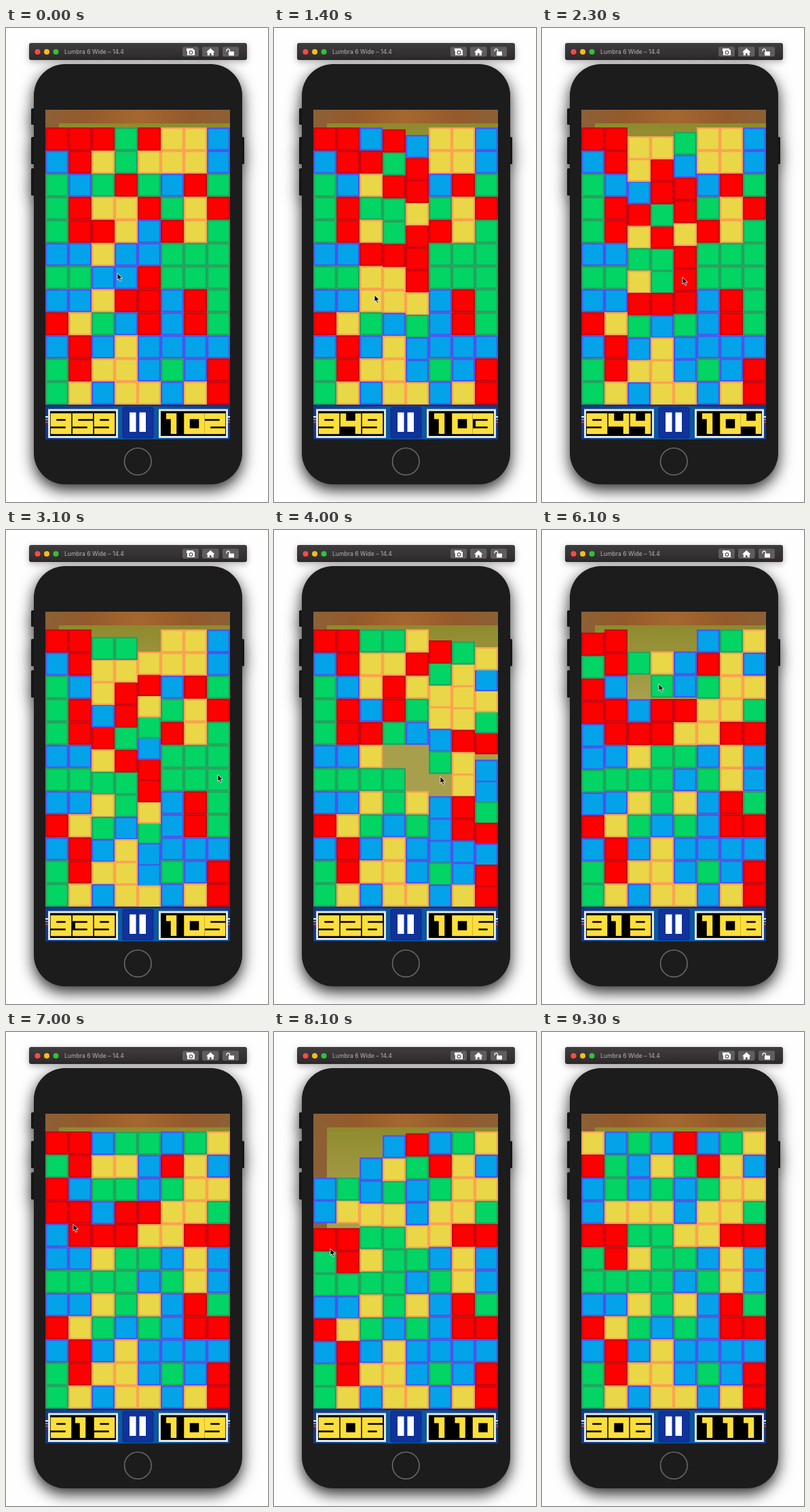
Recreate the animation shown at these times as an HTML page. Size 386 px wide and 696 px high, loop 9.4 s.

```html
<!DOCTYPE html>
<html lang="en">
<head>
<meta charset="utf-8">
<title>Block puzzle</title>
<style>
html, body { margin: 0; width: 100%; height: 100%; overflow: hidden; background: #fefefe; }
svg { display: block; width: 386px; height: 696px; }
</style>
</head>
<body>
<svg viewBox="0 0 386 696">
  <defs>
    <filter id="phoneShadow" x="-20%" y="-10%" width="140%" height="125%">
      <feDropShadow dx="0" dy="8" stdDeviation="11" flood-color="#000" flood-opacity=".85"/>
    </filter>
    <filter id="barShadow" x="-10%" y="-100%" width="120%" height="300%">
      <feDropShadow dx="0" dy="3" stdDeviation="5" flood-color="#000" flood-opacity=".3"/>
    </filter>
    <linearGradient id="bar" x2="0" y2="1">
      <stop offset="0" stop-color="#403c3e"/><stop offset="1" stop-color="#2d292b"/>
    </linearGradient>
    <radialGradient id="wood" cx=".5" cy=".03" r=".55">
      <stop offset="0" stop-color="#a5682f"/><stop offset=".5" stop-color="#945a2b"/><stop offset="1" stop-color="#8a6238"/>
    </radialGradient>
    <linearGradient id="olive" x2="0" y2=".25">
      <stop offset="0" stop-color="#8f8a2e"/><stop offset="1" stop-color="#a89f4c"/>
    </linearGradient>
    <linearGradient id="hud" x2="1" y2="0">
      <stop offset="0" stop-color="#123a8c"/><stop offset=".5" stop-color="#0a5da8"/><stop offset="1" stop-color="#123a8c"/>
    </linearGradient>
    <clipPath id="screen"><rect x="58" y="120" width="272" height="484"/></clipPath>
  </defs>

  <g filter="url(#barShadow)">
    <rect x="34" y="22" width="321" height="25" rx="3" fill="url(#bar)"/>
  </g>
  <circle cx="46.5" cy="35" r="4" fill="#fc4a44"/>
  <circle cx="60" cy="35" r="4" fill="#f6bd18"/>
  <circle cx="73.5" cy="35" r="4" fill="#2fc33a"/>
  <text x="86" y="38.3" font-family="Inter, 'Liberation Sans', sans-serif" font-size="8.6" fill="#b8b5b6">Lumbra 6 Wide – 14.4</text>
  <g fill="#605d5e">
    <rect x="260" y="27.5" width="24" height="14.5" rx="2.5"/>
    <rect x="289" y="27.5" width="24.5" height="14.5" rx="2.5"/>
    <rect x="319" y="27.5" width="24" height="14.5" rx="2.5"/>
  </g>
  <g fill="#fff">
    <path d="M266 30h10v2h2v8h-11v-6h-1z"/>
    <path d="M295 35.5l6.3-5.8 6.3 5.8h-1.8v4.8h-3.2v-3.3h-2.6v3.3h-3.2v-4.8z"/>
    <rect x="328" y="34.5" width="8" height="6" rx=".8"/>
  </g>
  <circle cx="272.5" cy="36" r="2.4" fill="none" stroke="#605d5e" stroke-width="1.2"/>
  <path d="M329.5 35v-2a2.2 2.2 0 0 0-4.4 0v1.5" fill="none" stroke="#fff" stroke-width="1.2"/>

  <g filter="url(#phoneShadow)" fill="#151516">
    <rect x="37" y="118" width="6" height="24" rx="1.5"/>
    <rect x="37" y="160" width="6" height="40" rx="1.5"/>
    <rect x="37" y="206" width="6" height="40" rx="1.5"/>
    <rect x="346" y="160" width="5" height="40" rx="1.5"/>
    <rect x="41" y="53" width="307" height="617" rx="46" fill="#1b1b1c"/>
  </g>
  <circle cx="194.3" cy="636.5" r="19.8" fill="none" stroke="#69696b" stroke-width="1.6"/>

  <g clip-path="url(#screen)">
    <rect x="58" y="120" width="272" height="484" fill="url(#wood)"/>
    <rect x="78" y="140" width="252" height="420" fill="url(#olive)"/>
    <g id="board"></g>
    <rect x="58" y="553" width="272" height="51" fill="url(#hud)"/>
    <rect x="58" y="553" width="272" height="2.5" fill="#17346f"/>
    <g stroke-width="1.8">
      <path d="M57 571h7M324 571h7" stroke="#e8f4f0"/>
      <path d="M57 575h7M324 575h7" stroke="#19b7c8"/>
      <path d="M57 579h7M324 579h7" stroke="#e0343a"/>
    </g>
    <g stroke="#e3e7de" stroke-width="3">
      <rect x="63.5" y="561" width="100" height="39.5"/>
      <rect x="226.5" y="561" width="99" height="39.5"/>
    </g>
    <rect x="172" y="557" width="45" height="45" rx="2" fill="#10329a" stroke="#0b2878"/>
    <path d="M182 564.5h9.5v28.5h-9.5zM196.5 564.5h9.5v28.5h-9.5z" fill="#fff"/>
    <g fill="none" stroke="#fddf3b" stroke-width="8.5" id="digits"></g>
  </g>
  <path id="cursor" d="M0 0v10l2.3-2 1.7 4 1.8-.8-1.7-3.8h3.2z" stroke="#fff" stroke-width=".8"/>
</svg>
<script>
const LOOP = 9400, SIZE = 34, LEFT = 58, TOP = 145, ROWS = 12, GRAVITY = 1600;
const NS = 'http://www.w3.org/2000/svg';
const board = document.getElementById('board');
const cursor = document.getElementById('cursor');
const digits = document.getElementById('digits');

// fill and edge colours
const COLORS = {
  R: ['#fd0000', '#cb0510'],
  G: ['#02d563', '#22a45f'],
  B: ['#03a3e9', '#4a55ee'],
  Y: ['#e9d748', '#fca451']
};
// starting columns, top to bottom
const START = ['RBGGGBGBRBGG', 'RRBRRBGBYRRY', 'RYGYRYBYGBYB', 'GGRYYBBRBYYY',
  'RYGRBBRRRBBY', 'YYBGRGGBBBGB', 'YYRYYGGRRBBY', 'BBGRGGGGGBRR'];
// new blocks for each column, in order of arrival
const REFILL = ['RGRBBRY', 'YGGB', 'BYYGYBBG', 'RGRRYGYGYB', 'RRYRRBGYRYBBGR', 'GRB', 'YG', 'RGYBY'];
// seconds, column, row
const CLICKS = [[.05, 3, 6], [.45, 4, 6], [1.45, 2, 7], [2.35, 4, 6], [3.2, 7, 6],
  [4, 5, 6], [5.1, 0, 2], [5.9, 3, 2], [7.15, 1, 4], [7.78, 0, 5]];
// seconds, x, y
const TRAIL = [[0, 164, 360], [.1, 164, 360], [.4, 203, 372], [.7, 203, 372], [1.3, 148, 392], [1.6, 148, 392],
  [2.2, 207, 366], [2.5, 207, 366], [3, 312, 359], [3.3, 312, 359], [3.9, 245, 362], [4.2, 245, 362],
  [4.9, 62, 233], [5.2, 62, 233], [5.8, 172, 226], [6.1, 172, 226], [6.9, 99, 282], [7.2, 99, 282],
  [7.6, 83, 318], [8.3, 83, 318], [8.8, 140, 330]];

const GLYPHS = ['M4 4H26V26H4Z', 'M4 4H15V30', 'M0 4H26V15H4V26H30', 'M0 4H26V26H0M4 15H26',
  'M4 0V15H26M26 0V30', 'M30 4H4V15H26V26H0', 'M30 4H4V26H26V15H4', 'M0 4H26V30',
  'M4 4H26V26H4ZM4 15H26', 'M26 15H4V4H26V26H0'];

function make(tag, attrs, parent) {
  const el = document.createElementNS(NS, tag);
  for (const k in attrs) el.setAttribute(k, attrs[k]);
  parent.appendChild(el);
  return el;
}

const blocks = [];
const hits = START.map(() => []);
const scores = [[0, 959]];

function addBlock(col, color, t, y, row) {
  const [fill, edge] = COLORS[color];
  const el = make('g', {}, board);
  make('rect', { width: SIZE, height: SIZE, fill: edge }, el);
  make('rect', { x: 2, y: 2, width: 30, height: 30, fill, stroke: edge, 'stroke-width': 1, 'stroke-opacity': .6 }, el);
  const block = { el, col, color, born: t, dies: Infinity, falls: [{ t, y, row }] };
  blocks.push(block);
  return block;
}

function heightAt(fall, t) {
  const dt = Math.max(0, t - fall.t);
  return Math.min(TOP + SIZE * fall.row, fall.y + GRAVITY / 2 * dt * dt);
}

function findGroup(cols, col, row) {
  const group = new Set(), color = cols[col][row].color;
  (function visit(c, r) {
    const b = cols[c] && cols[c][r];
    if (!b || b.color !== color || group.has(b)) return;
    group.add(b);
    visit(c - 1, r); visit(c + 1, r); visit(c, r - 1); visit(c, r + 1);
  })(col, row);
  return group;
}

function buildGame() {
  const cols = START.map((s, c) => [...s].map((k, r) => addBlock(c, k, 0, TOP + SIZE * r, r)));
  const queues = REFILL.map(s => [...s]);
  let score = scores[0][1];
  for (const [t, col, row] of CLICKS) {
    const group = findGroup(cols, col, row);
    group.forEach(b => b.dies = t);
    scores.push([t, score -= group.size]);
    cols.forEach((list, c) => {
      const kept = list.filter(b => !group.has(b));
      const n = ROWS - kept.length;
      if (!n) return;
      hits[c].push([t, n]);
      for (let i = 0; i < n; i++) {
        kept.unshift(addBlock(c, queues[c].shift(), t + .3, 70 - SIZE * i, n - 1 - i));
      }
      kept.forEach((b, r) => {
        const last = b.falls[b.falls.length - 1];
        if (last.row !== r) b.falls.push({ t: Math.max(t, b.born), y: heightAt(last, t), row: r });
      });
      cols[c] = kept;
    });
  }
}

// how far a column's top is pressed down by landing blocks
function squash(col, t) {
  let sum = 1;
  for (const [at, n] of hits[col]) {
    const d = (t - at - .65) / .17;
    if (t >= at) sum += 13 * n * Math.exp(-d * d / 2);
  }
  return Math.min(sum, 38);
}

function makeCounter(x, pitch) {
  return [0, 1, 2].map(i => make('path', { transform: `translate(${x + i * pitch} 566)` }, digits));
}

function setCounter(paths, value) {
  [...String(value)].forEach((d, i) => paths[i].setAttribute('d', GLYPHS[d]));
}

function latest(list, t) {
  return list.filter(e => e[0] <= t).pop();
}

function moveCursor(t) {
  const end = TRAIL[TRAIL.length - 1];
  cursor.style.display = t < end[0] ? '' : 'none';
  const i = TRAIL.findIndex(p => p[0] > t);
  if (i < 1) return;
  const [t0, x0, y0] = TRAIL[i - 1], [t1, x1, y1] = TRAIL[i];
  const p = (t - t0) / (t1 - t0), e = p * p * (3 - 2 * p);
  cursor.setAttribute('transform', `translate(${x0 + (x1 - x0) * e} ${y0 + (y1 - y0) * e})`);
}

buildGame();
const left = makeCounter(66, 32), right = makeCounter(232, 30.5);

function render(t) {
  const press = START.map((_, c) => squash(c, t));
  for (const b of blocks) {
    const alive = t >= b.born && t < b.dies;
    b.el.style.display = alive ? '' : 'none';
    if (!alive) continue;
    const fall = b.falls.filter(f => f.t <= t).pop();
    const y = heightAt(fall, t) + press[b.col] * (ROWS - fall.row) / ROWS;
    b.el.setAttribute('transform', `translate(${LEFT + SIZE * b.col} ${y.toFixed(2)})`);
  }
  setCounter(left, latest(scores, t)[1]);
  setCounter(right, 102 + Math.floor(t + .2));
  moveCursor(t);
}

const begin = performance.now();
function tick() {
  const ms = (performance.now() - begin) % LOOP;
  render(Math.floor(ms / 100) / 10);
  requestAnimationFrame(tick);
}
tick();
</script>
</body>
</html>
```
